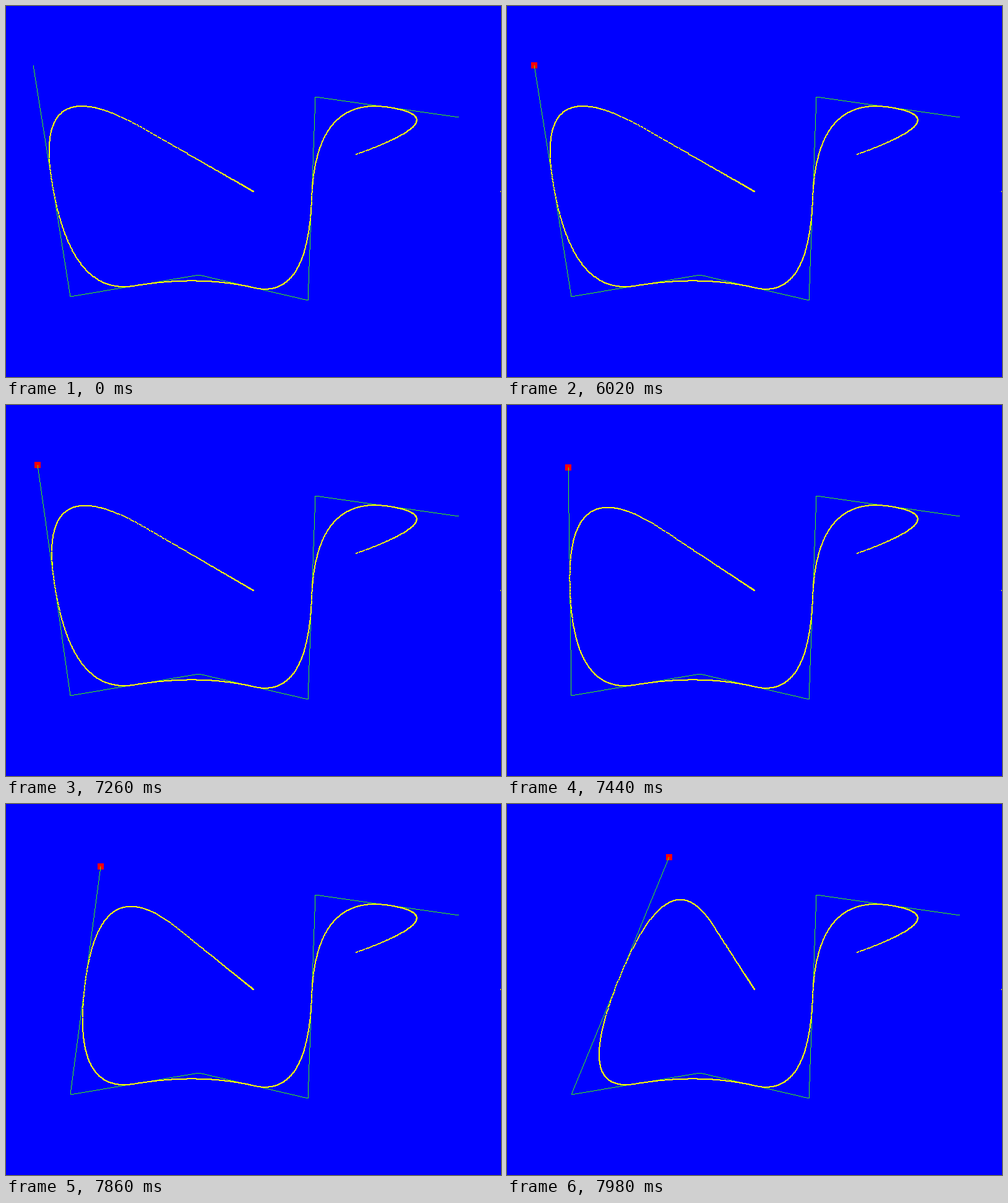
Recreate the animation shown at these times as an HTML page with a canvas. Size 800 by 600 pixels, loop 8 s.

```html
<!DOCTYPE html>
<html lang="en">
<head>
<meta charset="utf-8">
<title>Spline editor</title>
<style>
  html, body { margin: 0; width: 100%; height: 100%; overflow: hidden; background: #00f; }
  canvas { display: block; }
</style>
</head>
<body>
<canvas id="stage" width="800" height="600"></canvas>
<script>
const ctx = document.getElementById('stage').getContext('2d');
const LOOP = 8000;
const PICKED_AT = 6020;
const SAMPLES = 1000;
const ORIGIN = [400, 300];
const FIXED = [[104, 470], [312, 435], [488, 476], [500, 147], [732, 180]];

const snap = (time, tick) => Math.floor(time / tick) * tick;
const progress = (time, from, to) => Math.min(1, Math.max(0, (time - from) / (to - from)));
const ease = p => p * p * (3 - 2 * p);

// The handle is eased to the right, rests, then is flung up and away
function handleAt(time) {
  const drag = ease(progress(snap(time, 60), 7180, 7700));
  const fling = progress(snap(time, 20), 7940, 7980);
  return [
    Math.round(44 + 109 * drag + 109 * fling),
    Math.round(96 + 5 * Math.min(1, 2 * drag) - 15 * fling)
  ];
}

function dot(x, y, size) {
  ctx.fillRect(Math.round(x) - size / 2, Math.round(y) - size / 2, size, size);
}

// Hard-edged line, one pixel per step along the longer axis
function line([x0, y0], [x1, y1]) {
  const dx = x1 - x0, dy = y1 - y0;
  const n = Math.max(Math.abs(dx), Math.abs(dy));
  for (let i = 0; i < n; i++) {
    const k = (i + 0.5) / n;
    ctx.fillRect(Math.floor(x0 + dx * k), Math.floor(y0 + dy * k), 1, 1);
  }
}

// Uniform quadratic B-spline, plotted as separate points
function spline(pts) {
  const spans = pts.length - 2;
  for (let s = 0; s <= SAMPLES; s++) {
    const u = s / SAMPLES * spans;
    const i = Math.min(Math.floor(u), spans - 1);
    const t = u - i;
    const wa = (1 - t) * (1 - t) / 2, wc = t * t / 2, wb = 1 - wa - wc;
    const at = axis => wa * pts[i][axis] + wb * pts[i + 1][axis] + wc * pts[i + 2][axis];
    dot(at(0), at(1), 2);
  }
}

function draw(time) {
  const handle = handleAt(time);
  const polygon = [handle, ...FIXED];

  ctx.fillStyle = '#00f';
  ctx.fillRect(0, 0, 800, 600);

  if (time >= PICKED_AT) {
    ctx.fillStyle = '#f00';
    dot(...handle, 10);
  }

  ctx.fillStyle = '#40ff00';
  for (let i = 1; i < polygon.length; i++) line(polygon[i - 1], polygon[i]);

  ctx.fillStyle = '#ff0';
  spline([ORIGIN, ORIGIN, ...polygon, ORIGIN]);
  dot(800, 300, 2);
}

const start = performance.now();

function tick() {
  draw((performance.now() - start) % LOOP);
  requestAnimationFrame(tick);
}
tick();
</script>
</body>
</html>
```
